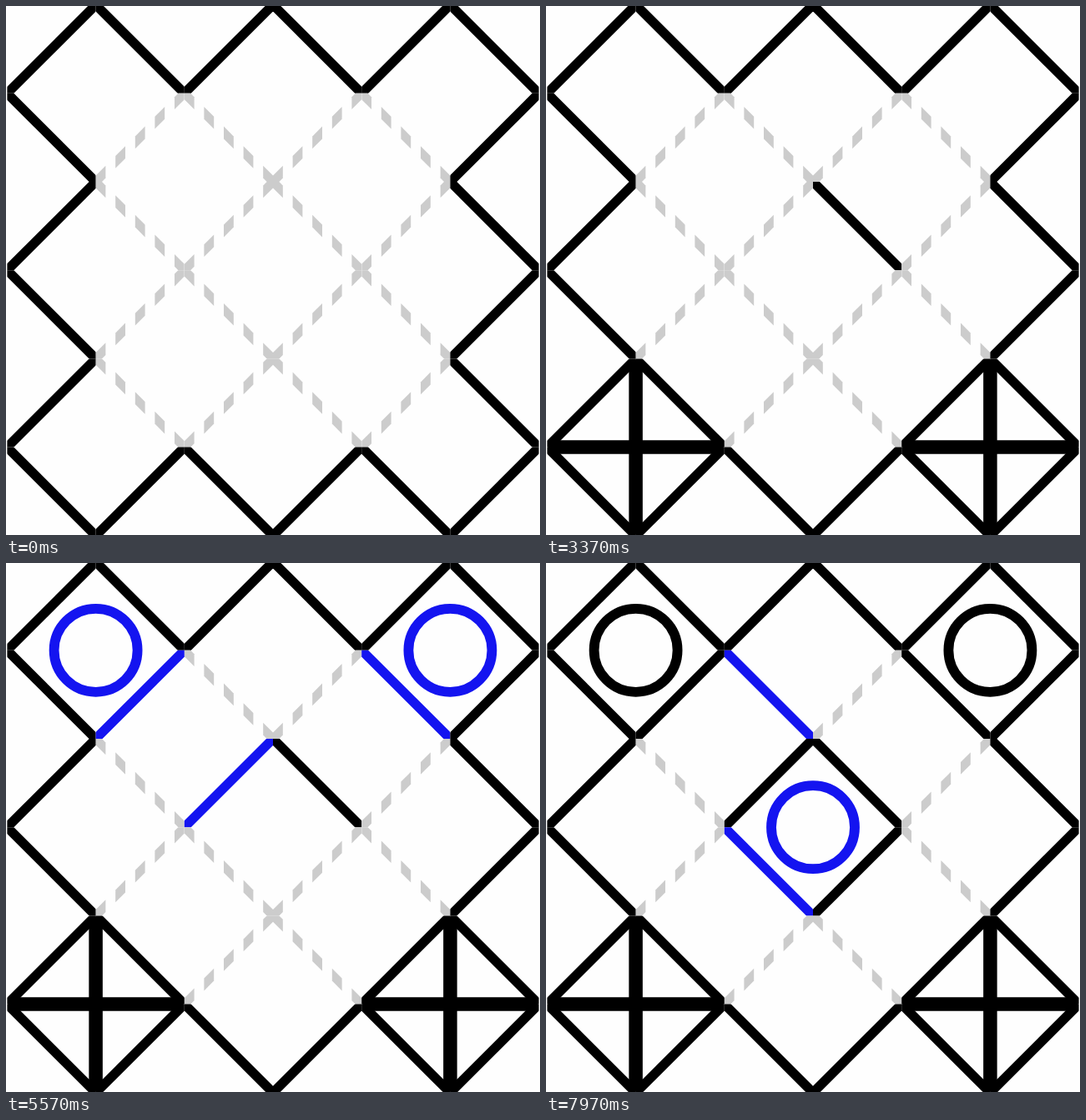
An HTML page for the animation above (8 s loop, 640 px wide and 635 px high).

```html
<!DOCTYPE html>
<html lang="en">
<head>
<meta charset="utf-8">
<title>Diamond boxes game</title>
<style>
  html, body { margin: 0; width: 100%; height: 100%; overflow: hidden; background: #fefefe; }
  svg { display: block; }
</style>
</head>
<body>
<svg id="stage" width="100%" height="100%" viewBox="0 0 640 635"></svg>
<script>
const NS = 'http://www.w3.org/2000/svg';
const LOOP = 8000;
const SIZE = 106.2, LEFT = 1.4, TOP = -1.4;
const BLACK = '#000', RED = '#e6001f', BLUE = '#1414f0', GRAY = '#ccc';
const stage = document.getElementById('stage');

function add(parent, tag, attrs) {
  const el = document.createElementNS(NS, tag);
  for (const key in attrs) el.setAttribute(key, attrs[key]);
  return parent.appendChild(el);
}

const px = i => LEFT + i * SIZE;
const py = i => TOP + i * SIZE;

// Each edge is the diagonal of one grid cell and is clipped to it.
function makeCell(c, r) {
  const box = add(stage, 'svg', { x: px(c), y: py(r), width: SIZE, height: SIZE, overflow: 'hidden' });
  const flip = (c + r) % 2 ? '' : `translate(0 ${SIZE}) scale(1 -1)`;
  return add(box, 'g', { transform: flip });
}

function bar(parent, a, b, half, fill) {
  const points = `${a},${a - half} ${b},${b - half} ${b},${b + half} ${a},${a + half}`;
  return add(parent, 'polygon', { points, fill });
}

const solid = parent => bar(parent, -9, SIZE + 9, 8, BLACK);

function dashes(parent) {
  const g = add(parent, 'g', {});
  const step = SIZE / 9;
  for (let i = 0; i < 9; i += 2) bar(g, i * step, (i + 1) * step, 7.4, GRAY);
  return g;
}

// A move fills an edge and may claim the box centred on a grid point.
const moves = [
  { at: 1150, settle: 3370, cell: [1, 4], color: RED, box: [1, 5] },
  { at: 1950, settle: 3370, cell: [4, 4], color: RED, box: [5, 5] },
  { at: 2450, settle: 3370, cell: [3, 2], color: RED },
  { at: 4080, settle: 6200, cell: [1, 1], color: BLUE, box: [1, 1] },
  { at: 4800, settle: 6200, cell: [4, 1], color: BLUE, box: [5, 1] },
  { at: 5300, settle: 6200, cell: [2, 2], color: BLUE },
  { at: 6550, settle: 7070, cell: [3, 3], color: RED },
  { at: 7370, settle: LOOP, cell: [2, 3], color: BLUE, box: [3, 3] },
  { at: 7850, settle: LOOP, cell: [2, 1], color: BLUE }
];

const cells = {};
for (let r = 0; r < 6; r++) {
  for (let c = 0; c < 6; c++) {
    const cell = makeCell(c, r);
    const rim = c % 5 === 0 || r % 5 === 0;
    if (rim) solid(cell);
    else cells[[c, r]] = { cell, dash: dashes(cell) };
  }
}

function makeMark(move) {
  const [x, y] = [px(move.box[0]), py(move.box[1])];
  const g = add(stage, 'g', { fill: 'none' });
  if (move.color === BLUE) {
    add(g, 'circle', { cx: x, cy: y, r: 50, 'stroke-width': 11.8 });
  } else {
    add(g, 'path', { d: `M${x - 97} ${y}h194M${x} ${y - 97}v194`, 'stroke-linecap': 'round' });
  }
  return g;
}

for (const move of moves) {
  const { cell, dash } = cells[move.cell];
  move.dash = dash;
  move.edge = solid(cell);
  if (move.box) move.mark = makeMark(move);
}

function show(el, on) {
  el.setAttribute('visibility', on ? 'visible' : 'hidden');
}

function draw(t) {
  for (const { at, settle, color, dash, edge, mark } of moves) {
    const on = t >= at;
    const fresh = t < settle;
    const ink = fresh ? color : BLACK;
    show(dash, !on);
    show(edge, on);
    edge.setAttribute('fill', ink);
    edge.setAttribute('stroke', fresh && color === RED ? '#b8041c' : 'none');
    edge.setAttribute('stroke-width', 0.8);
    if (!mark) continue;
    show(mark, on);
    mark.setAttribute('stroke', ink);
    if (color === RED) mark.setAttribute('stroke-width', fresh ? 15.5 : 16.5);
  }
}

function tick(now) {
  draw(now % LOOP);
  requestAnimationFrame(tick);
}
draw(0);
requestAnimationFrame(tick);
</script>
</body>
</html>
```
